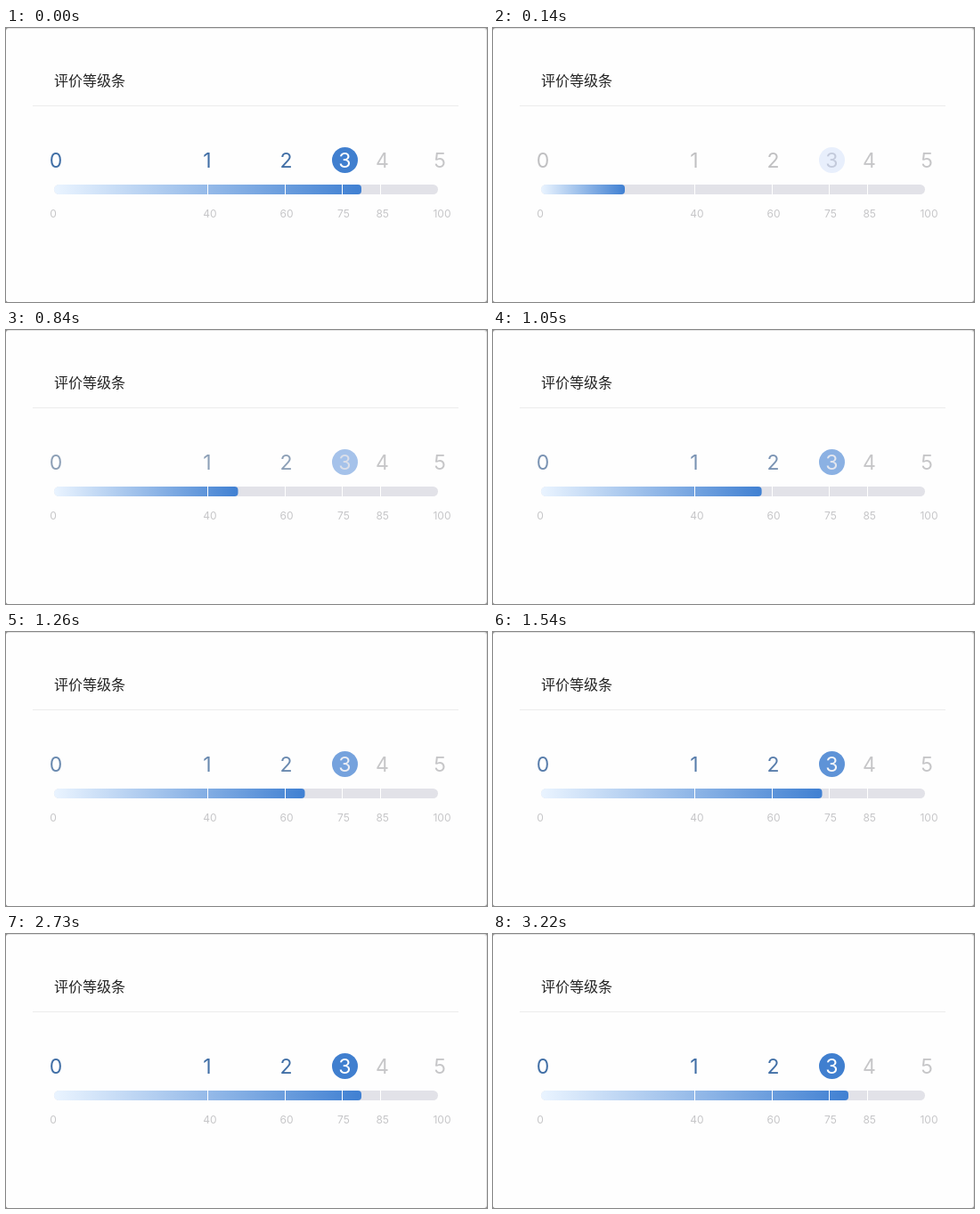
An HTML page with a canvas for the animation above (3.36 s loop, 540 by 308 pixels).

```html
<!DOCTYPE html>
<html lang="zh-CN">
<head>
<meta charset="utf-8">
<title>评价等级条</title>
<style>
  html, body { margin: 0; width: 100%; height: 100%; overflow: hidden; background: #fff; }
  canvas { display: block; width: 100vw; height: 100vh; }
</style>
</head>
<body>
<canvas id="stage" width="540" height="308"></canvas>
<script>
const ctx = document.getElementById('stage').getContext('2d');
const LOOP = 3360, STEP = 70;
const RESET = 70, REVEAL = 840, EASE_START = 390;
const BAR = { left: 54, right: 485, top: 176, height: 11, from: 148, to: 399 };
const GREY = [192, 192, 194], LIGHT = '#c6c6c8';

// Grade digit centre, score label, label centre
const grades = [
  [56, '0', 53], [226, '40', 229], [314.5, '60', 315],
  [380.3, '75', 379], [422.5, '85', 422.7], [487, '100', 489.5]
];
const dividers = [226, 313, 377, 420];

const mix = (a, b, p) => a + (b - a) * p;
const mixColor = (a, b, p) => `rgb(${a.map((v, i) => Math.round(mix(v, b[i], p)))})`;

function easeOut(time, end) {
  const p = Math.min(1, Math.max(0, (time - EASE_START) / (end - EASE_START)));
  return 1 - (1 - p) ** 2;
}

function progress(time, end) {
  if (time < RESET) return 1;
  return time < REVEAL ? 0 : easeOut(time, end);
}

function roundRect(x, y, w, h, r, fill) {
  ctx.fillStyle = fill;
  ctx.beginPath();
  ctx.roundRect(x, y, w, h, r);
  ctx.fill();
}

function text(str, x, y, font, color, align = 'center') {
  ctx.font = font;
  ctx.textAlign = align;
  ctx.fillStyle = color;
  ctx.fillText(str, x, y);
}

function drawCard() {
  ctx.fillStyle = '#8c8c8c';
  ctx.fillRect(0, 0, 540, 308);
  roundRect(0, 0, 540, 308, 3, '#e4e4e4');
  roundRect(0, 1, 539, 307, 3, '#fefefe');
  text('评价等级条', 54, 65, '500 16px "Noto Sans CJK SC", "Noto Sans CJK", sans-serif', '#222', 'left');
  ctx.fillStyle = '#ececec';
  ctx.fillRect(30, 87, 478, 1);
}

function drawBar(p) {
  const { left, right, top, height, from, to } = BAR;
  const end = mix(from, to, p);
  roundRect(left, top, right - left, height, 5.5, '#e2e2e8');
  const gradient = ctx.createLinearGradient(left, 0, end, 0);
  gradient.addColorStop(0, '#eaf4ff');
  gradient.addColorStop(1, '#4080d2');
  roundRect(left, top, end - left, height, [5.5, 4, 4, 5.5], gradient);
  ctx.fillStyle = '#fff';
  dividers.forEach(x => ctx.fillRect(x, top, 1, height));
}

function drawGrades(p) {
  ctx.fillStyle = mixColor([232, 239, 252], [64, 127, 207], p);
  ctx.beginPath();
  ctx.arc(380.5, 148.5, 14.5, 0, Math.PI * 2);
  ctx.fill();

  const reached = mixColor(GREY, [65, 111, 166], p);
  const active = mixColor([195, 202, 219], [255, 255, 255], p);
  grades.forEach(([x, score, scoreX], grade) => {
    const color = grade < 3 ? reached : grade === 3 ? active : LIGHT;
    text(grade, x, 157.3, '400 23px Inter, sans-serif', color);
    text(score, scoreX, 213, '400 12px Inter, sans-serif', LIGHT);
  });
}

function render(now) {
  const time = Math.floor((now % LOOP) / STEP) * STEP;
  drawCard();
  drawBar(progress(time, 2140));
  drawGrades(progress(time, 2380));
}

const start = performance.now();
function tick() {
  render(performance.now() - start);
  requestAnimationFrame(tick);
}
tick();
</script>
</body>
</html>
```
